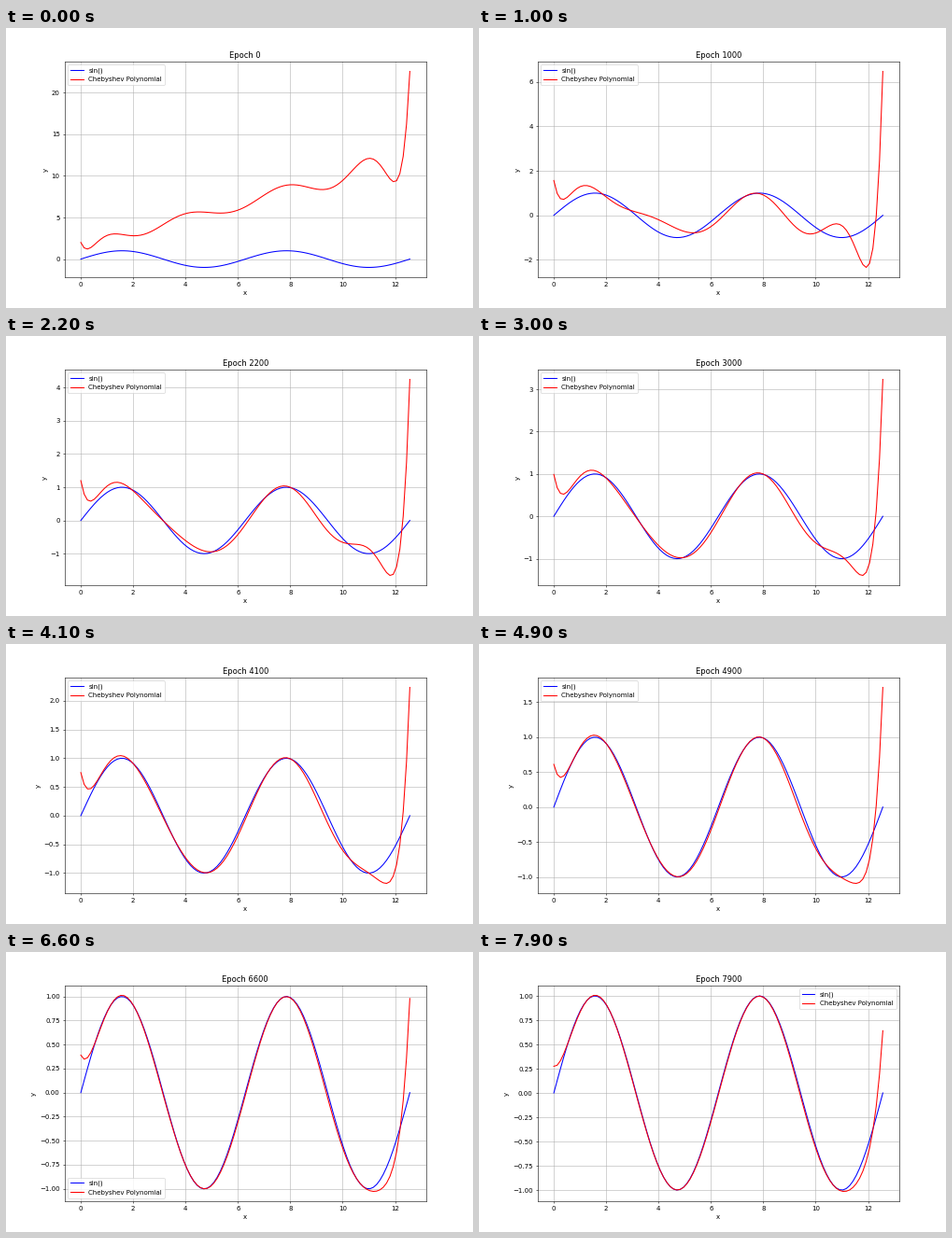
These frames come from a looping animation (500 by 300 pixels, 8 s). A matplotlib script:

```python
import numpy as np
import matplotlib.pyplot as plt
from matplotlib.animation import FuncAnimation

DEGREE = 10
RATE = 1e-3
STEPS = 100      # training epochs between frames
FRAMES = 80

x = np.linspace(0, 4 * np.pi, 100)
y = np.sin(x)

# Chebyshev basis on [-1, 1]; the linear term uses the raw x
u = x / (2 * np.pi) - 1
basis = np.cos(np.outer(np.arccos(np.clip(u, -1, 1)), np.arange(DEGREE + 1)))
basis[:, 1] = x


def train():
    """Gradient descent on the mean squared error, one curve per frame."""
    w = np.ones(DEGREE + 1)
    gram = basis.T @ basis / len(x)
    moment = basis.T @ y / len(x)
    curves = []
    for epoch in range(FRAMES * STEPS):
        if epoch % STEPS == 0:
            curves.append(basis @ w)
        w = w - 2 * RATE * (gram @ w - moment)
    return curves


curves = train()

fig, ax = plt.subplots(figsize=(10, 6), dpi=50)
ax.plot(x, y, color="blue", label="sin()")
fit, = ax.plot(x, curves[0], color="red", label="Chebyshev Polynomial")
title = ax.set_title("Epoch 0")
ax.set_xlabel("x")
ax.set_ylabel("y")
ax.grid(True)
ax.legend(loc="best")


def update(i):
    fit.set_data(x, curves[i])
    ax.relim()
    ax.autoscale_view()
    title.set_text(f"Epoch {i * STEPS}")
    return fit, title


anim = FuncAnimation(fig, update, frames=FRAMES, interval=100,
                     repeat=True, repeat_delay=0, blit=False)
plt.show()
```
